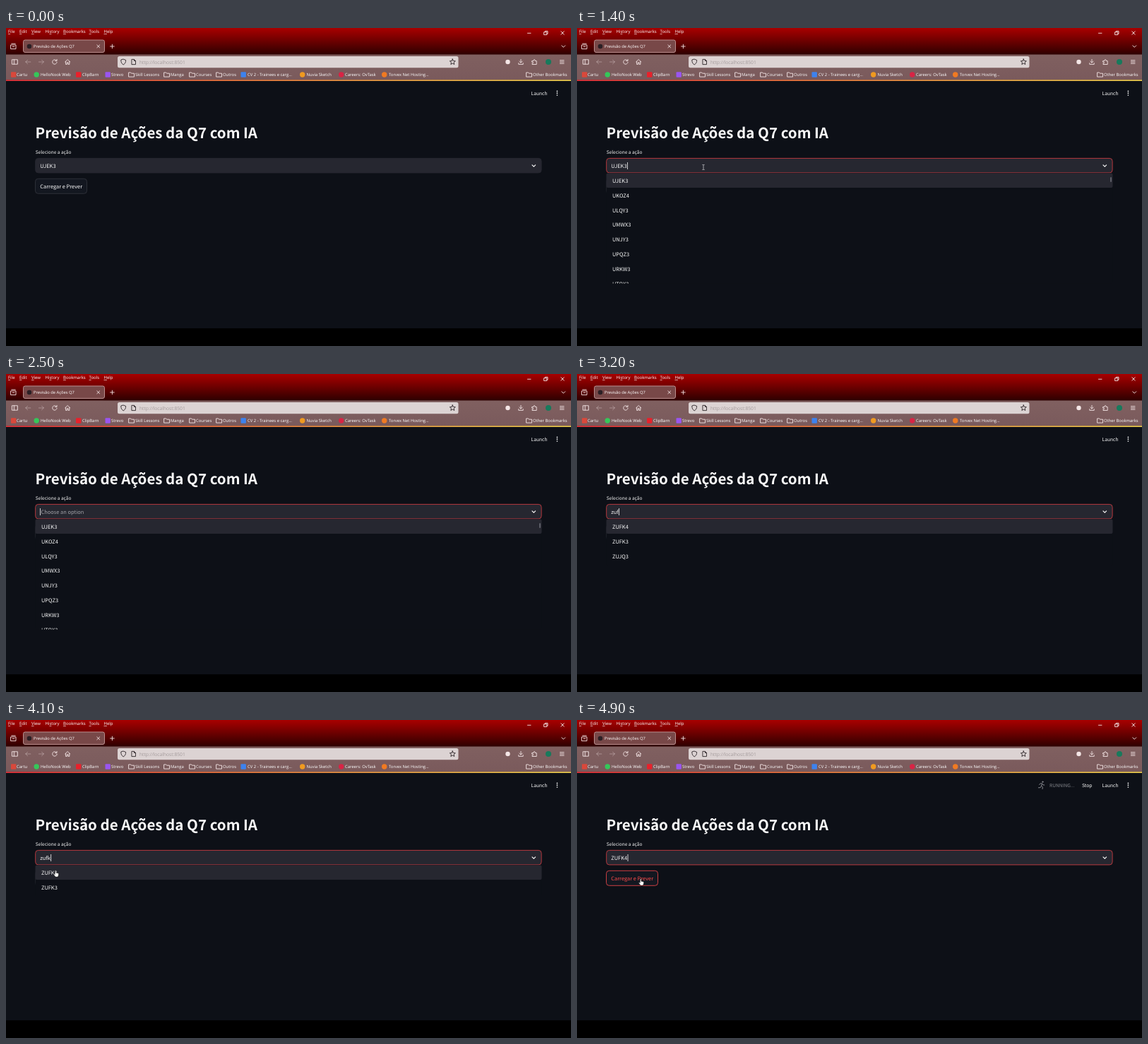
These frames come from a looping animation (800x450 px, 5000 ms). An HTML page:

```html
<!DOCTYPE html>
<html lang="pt">
<head>
<meta charset="utf-8">
<title>Previsão de Ações</title>
<style>
html, body { margin: 0; width: 100%; height: 100%; overflow: hidden; background: #000; }
svg { display: block; width: 800px; height: 450px; }
text { text-rendering: geometricPrecision; white-space: pre; }
.ui { font: 6px "Open Sans", "Noto Sans", sans-serif; fill: #fff; }
.app { font: 7.45px "Noto Sans CJK JP", "Noto Sans CJK SC", "Noto Sans", sans-serif; fill: #fafafa; }
.line { fill: none; stroke: #f4e6e6; stroke-width: .9; stroke-linecap: round; stroke-linejoin: round; }
.dim { opacity: .4; }
.dark { stroke: #2c2428; }
</style>
</head>
<body>
<svg viewBox="0 0 800 450" xmlns="http://www.w3.org/2000/svg">
  <defs>
    <linearGradient id="top" x2="0" y2="1">
      <stop offset="0" stop-color="#a80000"/><stop offset=".3" stop-color="#840000"/>
      <stop offset="1" stop-color="#2c0000"/>
    </linearGradient>
    <linearGradient id="bar" x2="0" y2="1">
      <stop offset="0" stop-color="#806060"/><stop offset="1" stop-color="#7a5a5c"/>
    </linearGradient>
    <linearGradient id="stripe">
      <stop offset="0" stop-color="#e8323c"/><stop offset=".4" stop-color="#ee7a40"/>
      <stop offset="1" stop-color="#f0d050"/>
    </linearGradient>
    <clipPath id="listClip"><rect x="41" y="205" width="718" height="156.5"/></clipPath>
  </defs>
  <rect width="800" height="450" fill="#000"/>
  <rect y="75" width="800" height="350" fill="#0d1017"/>
  <rect width="800" height="38" fill="url(#top)"/>
  <rect y="37.5" width="800" height="36" fill="url(#bar)"/>
  <rect y="73.3" width="800" height="1.7" fill="url(#stripe)"/>

  <rect x="24.5" y="17" width="115" height="17.5" rx="2.5" fill="#784848" stroke="#c49a9a" stroke-width=".9"/>
  <circle cx="33" cy="26" r="3.3" fill="#2b2025"/>
  <rect x="158" y="40" width="482.5" height="16.2" rx="2.5" fill="#dcd3d3"/>
  <g id="icons"></g>
  <g id="chrome"></g>

  <g id="page"></g>
  <g id="running" fill="none">
    <g stroke="#85878d" stroke-width="1" stroke-linecap="round" stroke-linejoin="round">
      <circle cx="659.4" cy="87.6" r=".7" fill="#85878d"/>
      <path d="M654.6 91.4l1.6-1.7 2.4.3-1.2 3.2 2 1.6-.4 2.8M657.4 93.4l-1.2 2.2-2.8.2M658.6 90l1.2 1.8 1.9.2"/>
    </g>
  </g>
  <g id="button">
    <rect x="41.5" y="213.3" width="73" height="21" rx="4" fill="#131720" stroke-width=".9"/>
    <text class="app" x="48.3" y="227.2">Carregar e Prever</text>
  </g>
  <rect id="field" x="41.7" y="184.4" width="716.4" height="20.5" rx="4" fill="#262730" stroke-width="1"/>
  <path class="line" d="M745 193.8l2.3 2.3 2.3-2.3" style="stroke:#fafafa;stroke-width:1.2"/>
  <text id="value" class="app" y="198"></text>
  <rect id="caret" y="190" width=".8" height="10" fill="#fafafa"/>
  <g id="list" clip-path="url(#listClip)">
    <rect id="pop" x="41.5" y="205.5" width="717" rx="3" fill="#0d1017"/>
    <rect x="41.5" y="205.5" width="717" height="20.5" rx="2" fill="#262730"/>
    <g id="items"></g>
    <rect id="thumb" x="755" y="211" width="2" height="7" rx="1" fill="#5c5e67"/>
  </g>
  <path id="beam" d="M-1.6-3.5h1.2l.4.4.4-.4h1.2M0-3.1v6.2M-1.6 3.5h1.2l.4-.4.4.4h1.2" fill="none" stroke="#c8c8cc" stroke-width=".8"/>
  <path id="hand" d="M-1.6-4.6c.8-.5 1.5 0 1.5.8v2.4l3 .7c.6.2.9.6.8 1.2l-.5 2.6-.9 1.5H-1L-3.3 1.5c-.6-.9.4-1.6 1.1-.9l.4.4v-4.8z" fill="#fff" stroke="#111" stroke-width=".6"/>
</svg>
<script>
const $ = id => document.getElementById(id);
const make = (parent, tag, attrs, text) => {
  const el = document.createElementNS("http://www.w3.org/2000/svg", tag);
  for (const k in attrs) el.setAttribute(k, attrs[k]);
  if (text !== undefined) el.textContent = text;
  parent.appendChild(el);
  return el;
};
const label = (x, y, text, style = "") => make($("chrome"), "text", { class: "ui", x, y, style }, text);
const stroke = (d, cls = "") => make($("icons"), "path", { class: "line " + cls, d });
const show = (id, on) => $(id).setAttribute("visibility", on ? "visible" : "hidden");

// Menu bar: x, text, index of the underlined letter
[[3, "File", 0], [19, "Edit", 0], [36, "View", 0], [55.5, "History", 2],
 [81, "Bookmarks", 0], [117.5, "Tools", 0], [138.5, "Help", 0]].forEach(([x, word, i]) => {
  const t = label(x, 7.2, "");
  make(t, "tspan", {}, word.slice(0, i));
  make(t, "tspan", { "text-decoration": "underline" }, word[i]);
  make(t, "tspan", {}, word.slice(i + 1));
});
label(39, 28.2, "Previsão de Ações Q7", "font-size:5.8px");
label(189, 50.7, "http://localhost:8501", "font-size:6.7px;fill:#a39a9b");

// Bookmarks: icon x, text x, text, icon colour (none for a folder)
[[7, 15, "Cartu", "#d9483b"], [39.5, 49, "HelloNook Web", "#35c759", 1], [99, 108, "ClipBarn", "#e8212b"],
 [140.5, 149, "Strevo", "#9a55f0"], [174, 183, "Skill Lessons"], [224, 233, "Manga"],
 [260, 269, "Courses"], [298, 307, "Outros"], [332.5, 342, "CV 2 - Trainees e carg…", "#3d82ee"],
 [416, 425.5, "Nuvia Sketch", "#f09a20", 1], [471, 480, "Careers: OvTask", "#d82445", 1],
 [532, 542, "Torvex Net Hosting…", "#f07a22", 1], [737, 746, "Other Bookmarks"]
].forEach(([ix, tx, text, fill, round]) => {
  if (!fill) stroke(`M${ix} 63h2.6l1 1.2h3.9v4.9h-7.5z`);
  else make($("icons"), "rect", { x: ix, y: 62.3, width: 7.4, height: 7.4, rx: round ? 3.7 : 1, fill });
  label(tx, 68.2, text, "font-size:5.9px");
});

// Window, tab strip and toolbar icons
stroke("M738.5 7.3h4.5M762 5.8h3.8v3.8h-3.8zM763.2 5.6v-1.2h3.8v3.8h-1M785.8 4.8l4.4 4.4m0-4.4l-4.4 4.4");
stroke("M7 24h7v5.6h-7zM7.8 22.2h5.4M9.2 26.4h2.6M128.8 24l3.8 3.8m0-3.8l-3.8 3.8M147.6 26h5.6m-2.8-2.8v5.6M786.8 24.8l2.5 2.5 2.5-2.5");
stroke("M8.8 44.8h7.6v6.4h-7.6zM11.4 44.8v6.4M71.4 46a3.2 3.2 0 1 0 .7 2.4M72 44.4v2.2h-2.2M83.6 48l3.6-3.4 3.6 3.4M84.6 47.4v4h1.8v-2.6h1.6v2.6h1.8v-4");
stroke("M34.8 48h-7m2.8-2.8l-2.8 2.8 2.8 2.8M46.4 48h7m-2.8-2.8l2.8 2.8-2.8 2.8", "dim");
stroke("M166.2 44.2l3.4 1.2c0 3.2-.8 5-3.4 6.5-2.6-1.5-3.4-3.3-3.4-6.5zM178.3 44.4h3.2l2 2v5.2h-5.2zM181.4 44.5v2h2", "dark");
const star = Array.from({ length: 10 }, (_, i) => {
  const a = i * Math.PI / 5, r = i % 2 ? 1.9 : 4.2;
  return (632.3 + r * Math.sin(a)).toFixed(2) + " " + (48.1 - r * Math.cos(a)).toFixed(2);
});
stroke("M" + star.join("L") + "z", "dark");
make($("icons"), "circle", { cx: 710.5, cy: 48, r: 3.2, fill: "#f4e6e6" });
stroke("M729 44.4v4.6m-2.2-2l2.2 2.2 2.2-2.2M725.8 49.6v1.8h6.4v-1.8");
stroke("M745 46.6h2v-.8a1.1 1.1 0 0 1 2.2 0v.8h2v4.9h-6.2v-1.6h.7a.8.8 0 0 0 0-1.7h-.7z");
make($("icons"), "circle", { cx: 768, cy: 48, r: 4, fill: "#187a5c" });
stroke("M784.4 45.8h5.6m-5.6 2.2h5.6m-5.6 2.2h5.6");

const appText = (parent, x, y, text, style = "") => make(parent, "text", { class: "app", x, y, style }, text);
appText($("page"), 41.5, 156, "Previsão de Ações da Q7 com IA", "font-size:20.5px;font-weight:700");
appText($("page"), 41.7, 178.3, "Selecione a ação", "font-size:6.52px");
appText($("page"), 743.5, 94.7, "Launch", "font-size:6.7px");
for (const y of [89.4, 92.2, 95]) make($("page"), "circle", { cx: 780.4, cy: y, r: .85, fill: "#fafafa" });
appText($("running"), 669, 94.6, "RUNNING...", "font-size:6.6px;fill:#85878d");
appText($("running"), 715, 94.7, "Stop", "font-size:6.7px");

const ALL = ["UJEK3", "UKOZ4", "ULQY3", "UMWX3", "UNJY3", "UPQZ3", "URKW3", "UTQX3"];
const Z = ["ZUFK4", "ZUFK3", "ZOQY3", "UKOZ4", "UPQZ3", "ZAJX3", "ZEWK4", "ZIVQ3"];
const ZU = ["ZUFK4", "ZUFK3", "ZUJQ3", "ZOUX4", "ZAXU3", "UKOZ4", "UPQZ3", "ZEQU3"];

// From each time on: text in the field, options of the open list
const FIELD = [
  [0, "UJEK3", []], [1400, "UJEK3", ALL], [2100, "UJEK", ["UJEK3"]], [2400, "U", ALL], [2500, "", ALL],
  [2700, "z", Z], [2900, "zu", ZU], [3200, "zuf", ZU.slice(0, 3)], [3600, "zufk", ["ZUFK4", "ZUFK3"]],
  [4300, "ZUFK4", []]
];
const CARET = [[0, 0], [1400, 1], [1900, 0], [2100, 1], [3800, 0], [4100, 1]];
const POINTER = [
  [0], [600, "beam", 412, 187], [700, "beam", 375, 189], [800, "beam", 270, 193], [900, "beam", 156, 196],
  [1000, "beam", 179, 197], [1500, "hand", 174, 207], [1600, "hand", 165, 214], [1700, "hand", 160, 218],
  [2400], [3800, "hand", 163, 230], [3900, "hand", 171, 247.5], [4000, "hand", 118, 233],
  [4100, "hand", 71, 217.5], [4400, "hand", 73, 219], [4600, "hand", 80, 223], [4700, "hand", 87, 227],
  [4800, "hand", 91, 229.5]
];
const at = (table, t) => table.findLast(row => row[0] <= t);

function setList(options) {
  const n = options.length, full = n > 7;
  show("list", n);
  show("thumb", full);
  $("pop").setAttribute("height", full ? 156 : n < 2 ? 20.5 : n * 20.85 + 3);
  $("items").textContent = "";
  options.forEach((o, i) => appText($("items"), 50, 218.8 + i * 20.85, o));
}

let current;
function draw(t) {
  const row = at(FIELD, t), open = t >= 1400;
  if (row !== current) {
    current = row;
    const empty = !row[1], value = $("value");
    value.textContent = row[1] || "Choose an option";
    value.setAttribute("x", empty ? 49.5 : 48.3);
    value.style.fill = empty ? "#a0a1a7" : "#fafafa";
    $("caret").setAttribute("x", empty ? 48 : 48.8 + value.getComputedTextLength());
    setList(row[2]);
  }
  $("field").setAttribute("stroke", open ? "#b5383e" : "#262730");
  show("caret", at(CARET, t)[1]);

  const hover = t >= 4600, [, kind, x, y] = at(POINTER, t);
  $("button").firstElementChild.setAttribute("stroke", hover ? "#e04548" : "#30333c");
  $("button").lastElementChild.style.fill = hover ? "#ff4b4b" : "#fafafa";
  show("running", t >= 4800);
  for (const id of ["beam", "hand"]) {
    show(id, id === kind);
    if (id === kind) $(id).setAttribute("transform", `translate(${x} ${y})`);
  }
}

const start = performance.now();
function tick() {
  draw((performance.now() - start) % 5000);
  requestAnimationFrame(tick);
}
draw(0);
requestAnimationFrame(tick);
</script>
</body>
</html>
```
